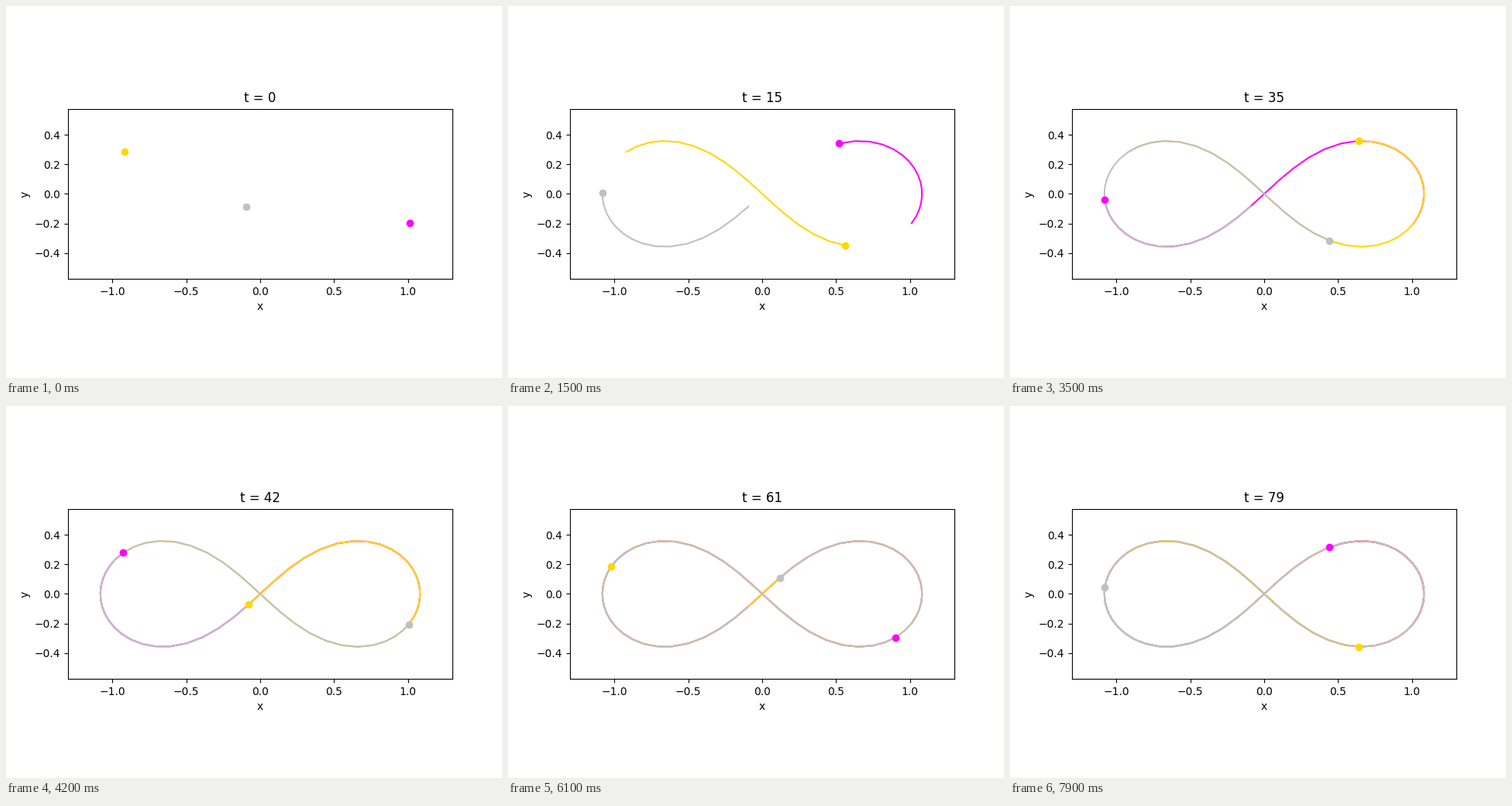
A matplotlib script for the animation above (8 s loop, 640 px wide and 480 px high).

```python
import numpy as np
import matplotlib.pyplot as plt
from matplotlib.animation import FuncAnimation

FRAMES = 80
DT = 0.1
SUBSTEPS = 20
COLORS = ["magenta", "gold", "silver"]


def accel(pos):
    """Gravity between three equal unit masses."""
    diff = pos[None] - pos[:, None]
    dist2 = (diff ** 2).sum(axis=2) + np.eye(3)
    return (diff / dist2[..., None] ** 1.5).sum(axis=1)


def deriv(state):
    return np.array([state[1], accel(state[0])])


def rk4(state, h):
    k1 = deriv(state)
    k2 = deriv(state + h / 2 * k1)
    k3 = deriv(state + h / 2 * k2)
    k4 = deriv(state + h * k3)
    return state + h / 6 * (k1 + 2 * k2 + 2 * k3 + k4)


def simulate():
    """Figure-eight orbit, sampled every DT starting after one step."""
    p = np.array([0.97000436, -0.24308753])
    v = np.array([-0.93240737, -0.86473146])
    state = np.array([[p, -p, 0 * p], [-v / 2, -v / 2, v]])
    path = []
    for _ in range(FRAMES):
        for _ in range(SUBSTEPS):
            state = rk4(state, DT / SUBSTEPS)
        path.append(state[0])
    return np.array(path)


path = simulate()

fig, ax = plt.subplots(figsize=(6.4, 4.8), dpi=100)
ax.set_aspect("equal")
ax.set_xlim(-1.3, 1.3)
ax.set_ylim(-0.575, 0.575)
ax.set_xlabel("x")
ax.set_ylabel("y")
title = ax.set_title("t = 0")

trails = [ax.plot([], [], color=c)[0] for c in COLORS]
dots = [ax.plot([], [], "o", color=c)[0] for c in COLORS]


def update(i):
    for body, (trail, dot) in enumerate(zip(trails, dots)):
        trail.set_data(path[:i + 1, body].T)
        dot.set_data(path[i:i + 1, body].T)
    title.set_text(f"t = {i}")
    return [*trails, *dots, title]


anim = FuncAnimation(fig, update, frames=FRAMES, interval=100,
                     repeat=True, repeat_delay=0)
plt.show()
```
